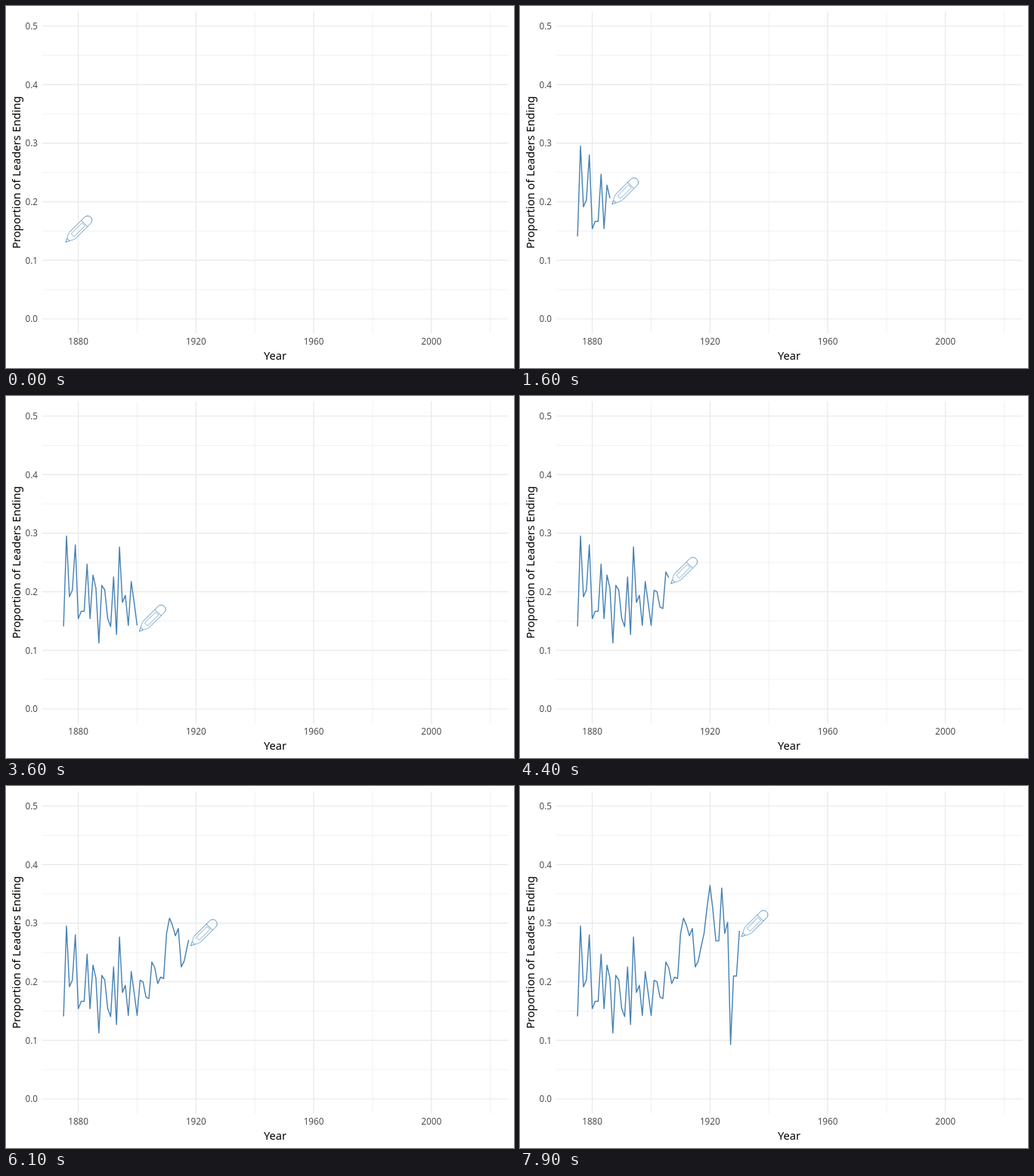
An HTML page that plays this animation: 672x480 px, repeating every 8000 ms.

```html
<!DOCTYPE html>
<html lang="en">
<head>
<meta charset="utf-8">
<title>Proportion of Leaders Ending</title>
<style>
  html, body { margin: 0; width: 100%; height: 100%; overflow: hidden; background: #fff; }
  svg { display: block; }
  text { font: 11.73px "Noto Sans", "Open Sans", sans-serif; fill: #4d4d4d; }
  .title { font-size: 14.67px; fill: #000; text-anchor: middle; }
  .end { text-anchor: end; }
  .mid { text-anchor: middle; }
  path { fill: none; stroke: #ebebeb; }
  #line { stroke: #4682b4; stroke-width: 1.42; stroke-linejoin: round; }
  #pencil path { stroke: #4682b4; stroke-width: .8; stroke-linejoin: round; }
  #pencil .thin { stroke-width: .6; }
</style>
</head>
<body>
<svg width="672" height="480" viewBox="0 0 672 480">
  <path id="minor" stroke-width=".71"/>
  <path id="major" stroke-width="1.42"/>
  <g id="labels"></g>
  <text class="title" x="356" y="469">Year</text>
  <text class="title" transform="translate(18.5 220.7) rotate(-90)">Proportion of Leaders Ending</text>
  <path id="line"/>
  <g id="pencil">
    <!-- drawn along the x axis, tip at the origin -->
    <g transform="translate(2.8 7.8) rotate(-45)">
      <path d="M13 -5.8H41.1A5.8 5.8 0 0 1 41.1 5.8H13M35 -5.8V5.8M0 0L5 -2.3V2.3Z"/>
      <path class="thin" d="M5 -2.3Q8 -4.8 13 -5.8M5 2.3Q8 4.8 13 5.8M13 -2.7H33.3V2.7H13Z"/>
    </g>
  </g>
</svg>
<script>
const FIRST_YEAR = 1875, FRAME_MS = 100, LOOP_MS = 8000;
const FRAMES_PER_YEAR = 199 / 139;
const values = [
  .141, .295, .1915, .203, .28, .154, .1667, .1667, .247, .154, .2286, .206, .1125, .211,
  .203, .1543, .1405, .2254, .127, .2763, .1818, .194, .1425, .2174, .181, .1425, .2025, .2,
  .1739, .1714, .2338, .2239, .197, .208, .2055, .2824, .3086, .2965, .2785, .291, .2254,
  .2353, .26, .283, .327, .3645, .322, .2698, .2698, .36, .2826, .3016, .093, .2097, .2097, .287
];

const $ = id => document.getElementById(id);
const px = year => 95.6 + (year - 1880) * 3.893;
const py = v => 414.9 - v * 776.6;
const vertical = year => `M${px(year)} 7.3V434.4`;
const horizontal = v => `M48 ${py(v)}H664.7`;
const label = (x, y, cls, s) => `<text class="${cls}" x="${x}" y="${y}">${s}</text>`;

let major = "", minor = "", labels = "";
for (let i = 0; i < 4; i++) {
  const year = 1880 + i * 40;
  major += vertical(year);
  minor += vertical(year + 20);
  labels += label(px(year), 449, "mid", year);
}
for (let i = 0; i < 6; i++) {
  major += horizontal(i / 10);
  if (i < 5) minor += horizontal(i / 10 + .05);
  labels += label(42, py(i / 10) + 4.3, "end", (i / 10).toFixed(1));
}
$("major").setAttribute("d", major);
$("minor").setAttribute("d", minor);
$("labels").innerHTML = labels;

const points = values.map((v, i) => [px(FIRST_YEAR + i), py(v)]);
// each year lands on a whole frame; frames between two years are interpolated
const frameOf = i => Math.round(i * FRAMES_PER_YEAR);

function draw() {
  const frame = Math.floor(performance.now() % LOOP_MS / FRAME_MS);
  let i = 0;
  while (i < points.length - 1 && frameOf(i + 1) <= frame) i++;
  const [a, b = a] = points.slice(i, i + 2);
  const part = (frame - frameOf(i)) / (frameOf(i + 1) - frameOf(i));
  const head = a.map((c, k) => c + (b[k] - c) * part);
  const trail = points.slice(0, i + 1);
  if (part) trail.push(head);
  $("line").setAttribute("d", "M" + trail.join("L"));
  $("pencil").setAttribute("transform", `translate(${head})`);
  requestAnimationFrame(draw);
}
draw();
</script>
</body>
</html>
```
